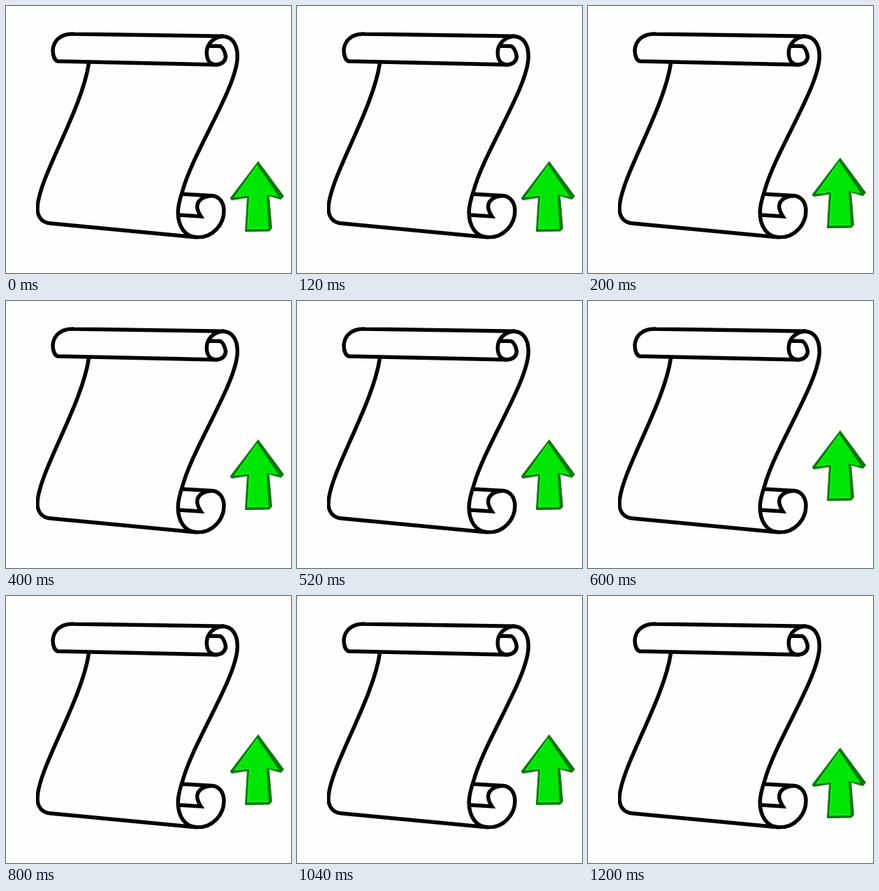
Recreate the animation shown at these times as an HTML page. Size 408x382 px, loop 1400 ms.

```html
<!DOCTYPE html>
<html lang="en">
<head>
<meta charset="utf-8">
<title>Scroll up</title>
<style>
  html, body { margin: 0; width: 100%; height: 100%; overflow: hidden; background: #fefefc; }
  svg { display: block; width: 408px; height: 382px; }
  .ink { fill: none; stroke: #000; stroke-width: 5.5; stroke-linejoin: miter; }
</style>
</head>
<body>
<svg viewBox="0 0 408 382">
  <clipPath id="page"><rect x="43" y="30" width="300" height="303.5"/></clipPath>
  <g class="ink" clip-path="url(#page)">
    <!-- top roll -->
    <path d="M312 43.3 L97 40 C78 39 68 50 67 63 C67 72 70 78 74 79 L302 84"/>
    <path d="M312 43.3 C298 44 287.3 53 287.3 67 C287.3 78 293 84 301.5 84 C310 83.5 314.5 78 314.5 72 C313.5 66 311 60 307 57.5 L291 57"/>
    <!-- sheet and bottom curl -->
    <path d="M308 43.3 C325 43 331.3 56 331.3 72 C331.3 115 270 205 253.5 262 C248.5 277 246.2 285 246.2 295 C246.2 315 256 330.5 274 331 C297 331 312 312 312 293 C312 280 304 272 295 271.5 L252 269"/>
    <path d="M295 271.5 C280 272 272 280 274 290 C275 295 277 298 279 301 L248 299"/>
    <path d="M274 331 L64 311 C50 310 45 300 45 290 C45 248 108.5 150 118.5 82"/>
  </g>
  <g id="arrow">
    <path fill="#087a0c" stroke="#087a0c" stroke-linejoin="round"
      d="M361 222.5 L397.5 272 L393.5 276.5 L376.5 271.5 L380.5 318 L377 322 L342.5 322.5 L345.5 274 L323 277.5 L321 275 Z"/>
    <path fill="#00e604"
      d="M359.5 227 L390.5 273 L373 270 L376 319 L345 319.5 L348 271.5 L326 274 Z"/>
    <path fill="none" stroke="#7df07d" stroke-width=".8" opacity=".4"
      d="M359.5 229.5 L328.5 272.5 L349.5 270 L346.5 318 L374.5 317.5"/>
  </g>
</svg>
<script>
  const LOOP = 1400;
  // [start in ms, vertical shift in px]
  const steps = [[0, 0], [200, -5], [400, -24], [600, -37], [800, -24], [1200, -5]];
  const frames = steps.map(([t, y]) => ({
    offset: t / LOOP,
    transform: `translate(0px, ${y}px)`,
    easing: "steps(1, end)"
  }));
  frames.push({ offset: 1, transform: "translate(0px, 0px)" });
  const anim = document.getElementById("arrow").animate(frames, { duration: LOOP, iterations: Infinity });
  anim.startTime = 0;
</script>
</body>
</html>
```
